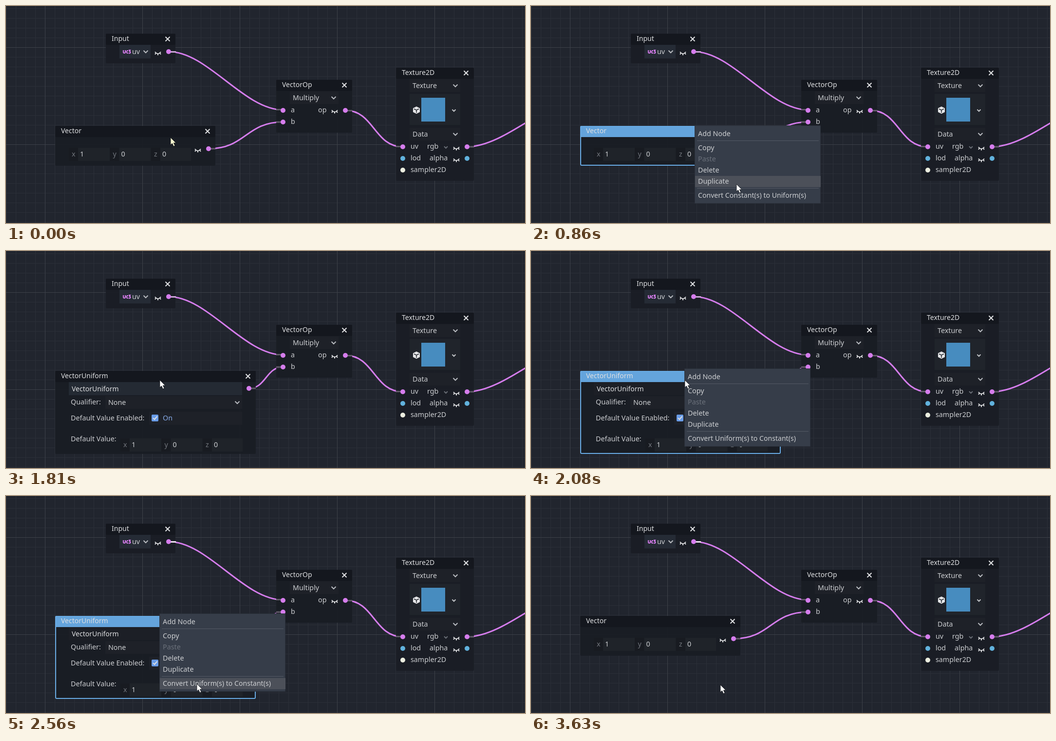
An HTML page that plays this animation: 1066 px wide and 447 px high, repeating every 3.7 s.

```html
<!DOCTYPE html>
<html lang="en">
<head>
<meta charset="utf-8">
<title>Shader graph: constant to uniform</title>
<style>
html, body { margin: 0; width: 100%; height: 100%; overflow: hidden; background: #21252e; }
svg { display: block; width: 1066px; height: 447px; }
text { font: 14.3px "Noto Sans", "Open Sans", sans-serif; fill: #cdcfd2; white-space: pre; }
.title { font-size: 14px; fill: #dfe0e2; }
.long { font-size: 14.1px; }
.dim { fill: #72767d; }
.off { fill: #6b717b; }
.on { fill: #86abe8; }
.line { fill: none; stroke: #e0e1e3; stroke-width: 2; }
.wire { fill: none; stroke: #d67ded; stroke-width: 3; }
.stub { stroke: #615a68; stroke-width: 3; }

.t { animation: 3.7s step-end infinite; }
.vector-idle { animation-name: vector-idle; }
.vector-picked { animation-name: vector-picked; }
.vector-wire { animation-name: vector-wire; }
.uniform-idle { animation-name: uniform-idle; }
.uniform-picked { animation-name: uniform-picked; }
.uniform-wire { animation-name: uniform-wire; }
.menu-a { animation-name: menu-a; }
.menu-b { animation-name: menu-b; }
.hover-a { animation-name: hover-a; }
.hover-b { animation-name: hover-b; }
.glow { animation-name: glow; }
.click { animation-name: click; }
.cursor { animation-name: cursor; }
.arrow { animation-name: arrow; }

@keyframes vector-idle { 0%, 80%, 100% { opacity: 1 } 12.16% { opacity: 0 } }
@keyframes vector-picked { 0%, 35.94%, 100% { opacity: 0 } 12.16% { opacity: 1 } }
@keyframes vector-wire { 0%, 80%, 100% { opacity: 1 } 35.94% { opacity: 0 } }
@keyframes uniform-idle { 0%, 52.43%, 100% { opacity: 0 } 35.94% { opacity: 1 } }
@keyframes uniform-picked { 0%, 80%, 100% { opacity: 0 } 52.43% { opacity: 1 } }
@keyframes uniform-wire { 0%, 80%, 100% { opacity: 0 } 35.94% { opacity: 1 } }
@keyframes menu-a { 0%, 35.94%, 100% { opacity: 0 } 15.94% { opacity: 1 } }
@keyframes menu-b { 0%, 80%, 100% { opacity: 0 } 54.32% { opacity: 1 } }
@keyframes hover-a {
  0%, 100% { opacity: 0; transform: translateY(252px) }
  17.83% { opacity: 1; transform: translateY(252px) }
  19.45% { opacity: 1; transform: translateY(281px) }
  21.35% { opacity: 1; transform: translateY(327px) }
  23.24% { opacity: 1; transform: translateY(350px) }
  24.86% { opacity: 1; transform: translateY(379px) }
}
@keyframes hover-b {
  0%, 100% { opacity: 0; transform: translateY(252px) }
  57.83% { opacity: 1; transform: translateY(252px) }
  59.72% { opacity: 1; transform: translateY(281px) }
  61.62% { opacity: 0; transform: translateY(281px) }
  63.51% { opacity: 1; transform: translateY(327px) }
  65.4% { opacity: 1; transform: translateY(350px) }
  67.29% { opacity: 1; transform: translateY(379px) }
}
@keyframes glow { 0%, 100% { stroke: #cda9d8 } 59.72% { stroke: #f0e6f2 } }
@keyframes click {
  0%, 15.94%, 37.83%, 55.94%, 85.4%, 100% { opacity: 0 }
  10.54%, 34.05%, 52.43%, 80% { opacity: 1 }
}
@keyframes arrow { 0%, 100% { fill: #f5f5cf } 1.89% { fill: #fff } }
@keyframes cursor {
  0%, 100% { transform: translate(338px, 271px) }
  17.83% { transform: translate(345px, 281px) }
  19.45% { transform: translate(370px, 311px) }
  21.35% { transform: translate(402px, 345px) }
  23.24% { transform: translate(422px, 367px) }
  24.86% { transform: translate(428px, 382px) }
  26.75% { transform: translate(430px, 390px) }
  37.83% { transform: translate(425px, 384px) }
  39.72% { transform: translate(404px, 358px) }
  41.62% { transform: translate(372px, 322px) }
  43.24% { transform: translate(343px, 292px) }
  45.13% { transform: translate(326px, 275px) }
  47.02% { transform: translate(318px, 268px) }
  48.91% { transform: translate(316px, 266px) }
  57.83% { transform: translate(321px, 272px) }
  59.72% { transform: translate(338px, 288px) }
  61.62% { transform: translate(358px, 308px) }
  63.51% { transform: translate(375px, 352px) }
  65.4% { transform: translate(384px, 371px) }
  67.29% { transform: translate(390px, 382px) }
  69.18% { transform: translate(392px, 387px) }
  94.32% { transform: translate(391px, 388px) }
  96.21% { transform: translate(390px, 389px) }
  98.1% { transform: translate(389px, 389px) }
}
</style>
</head>
<body>
<svg id="stage" viewBox="0 0 1066 447"></svg>
<script>
const PINK = '#d67ded', BLUE = '#61b2dd', PALE = '#ebeddf', PICKED = '#69ace6';

const rect = (x, y, w, h, fill, extra = '') =>
  `<rect x="${x}" y="${y}" width="${w}" height="${h}" fill="${fill}" ${extra}/>`;
const text = (x, y, str, cls = '') => `<text x="${x}" y="${y}" class="${cls}">${str}</text>`;
const line = (d, x = 0, y = 0, extra = '') =>
  `<path class="line" d="${d}" transform="translate(${x} ${y})" ${extra}/>`;
const group = (cls, body, extra = '') => `<g class="t ${cls}" ${extra}>${body}</g>`;

const port = (x, y, fill = PINK) => `<circle cx="${x}" cy="${y}" r="5" fill="${fill}"/>`;
const stub = (x, y, end, cls = '') => `<path class="stub ${cls}" d="M${x} ${y}H${end}"/>`;
const close = (x, y) => line('M-4.5-4.5 4.5 4.5M4.5-4.5-4.5 4.5', x, y);
const eye = (x, y) => line('M-6-2.5Q0 5 6-2.5M-4.2.5-6 2.6M0 1v3.5M4.2.5 6 2.6', x, y);
const chevron = (x, y, r = 4.5, color = '#b9bcc1') =>
  line(`M${-r} ${-r / 2}L0 ${r / 2} ${r} ${-r / 2}`, x, y, `style="stroke:${color}"`);

// Horizontal S-curve between two ports
function wire(x1, y1, x2, y2) {
  const c = Math.min(80, (x2 - x1) / 2);
  return `<path class="wire" d="M${x1} ${y1}C${x1 + c} ${y1} ${x2 - c} ${y2} ${x2} ${y2}"/>`;
}

function grid() {
  let minor = '', major = '';
  for (let x = 0; x < 1066; x += 20) {
    const d = `M${x + .5} 0V447`;
    x % 200 === 80 ? major += d : minor += d;
  }
  for (let y = 5; y < 447; y += 20) {
    const d = `M0 ${y + .5}H1066`;
    y % 200 === 85 ? major += d : minor += d;
  }
  return `<path d="${minor}" stroke="#2b2f38"/><path d="${major}" stroke="#3d4149"/>`;
}

function frame(x, y, w, h, title, picked) {
  const body = rect(x, y, w, h, '#1a1d24', 'rx="2" opacity=".92"');
  const head = rect(x, y, w, 23, picked ? PICKED : '#15181e', 'rx="2" opacity=".95"');
  const edge = picked
    ? rect(x + 1, y + 1, w - 2, h - 2, 'none', `rx="2" stroke="${PICKED}" stroke-width="2"`) : '';
  return body + head + edge + text(x + 12, y + 15, title, 'title') + close(x + w - 16, y + 11);
}

function dropdown(x, y, w, h, label, fill = '#1e2128') {
  return rect(x, y, w, h, fill) + text(x + 6, y + h / 2 + 5, label) + chevron(x + w - 10, y + h / 2);
}

// Three number boxes, x y z
function fields(x, y) {
  return ['x', 'y', 'z'].map((name, i) => {
    const left = x + i * 84.5;
    return rect(left, y, 19, 27, '#181b21') + rect(left + 19, y, i < 2 ? 65 : 63, 27, '#1f2329') +
      text(left + 6, y + 17.5, name, 'dim') + text(left + 23, y + 18, i ? 0 : 1);
  }).join('');
}

const inputNode = frame(205, 57, 143, 61, 'Input') +
  rect(233, 80, 64, 28, '#252b35') +
  line('M241 91v4q0 2 2 2t2-2v-4M251 92h-1q-2.5 0-2.5 2.5t2.5 2.5h1M252 91h3l-1.5 2.5q2.5.5 2 2.5t-3.5 1',
    0, 0, `style="stroke:${PINK}"`) +
  text(259, 99, 'uv') + chevron(287, 94) + eye(312, 97) +
  stub(334, 94.5, 349, 't glow') + port(334, 94);

const opNode = frame(555, 152, 156, 109, 'VectorOp') +
  dropdown(583, 176, 100, 26, 'Multiply') +
  text(585, 219, 'a') + text(641, 219, 'op') + text(585, 243, 'b') + eye(675, 217) +
  stub(555, 213.5, 569) + stub(555, 239, 569) + stub(697, 215.5, 711) +
  port(569, 215) + port(569, 239) + port(697, 215);

const cube = '<path d="M843 207l7 3.5v8l-7 3.5-7-3.5v-8z" fill="#e4e5e7"/>' +
  '<path d="M838 212l5 2.5 5-2.5M843 214.5v5.5" fill="none" stroke="#20242b" stroke-width="1.5"/>';

const textureNode = frame(801, 127, 160, 233, 'Texture2D') +
  dropdown(829, 151, 104, 26, 'Texture') +
  rect(829, 181, 104, 64, '#20242b') + cube +
  rect(853, 189, 49, 49, '#478cbf') + chevron(920, 215, 3.5, '#c5c7cb') +
  dropdown(829, 251, 104, 26, 'Data') +
  text(831, 294, 'uv') + text(865, 294, 'rgb') + chevron(903.5, 291, 3.5, '#6a6e76') +
  text(831, 318, 'lod') + text(870, 318, 'alpha') + text(831, 342, 'sampler2D') +
  eye(925, 293) + eye(925, 317) +
  stub(801, 289.5, 815) + stub(947, 290, 961) +
  port(815, 290) + port(815, 314, BLUE) + port(815, 338, PALE) +
  port(947, 290) + port(947, 314, BLUE);

const vectorNode = picked => frame(101, 247, 329, 82, 'Vector', picked) +
  fields(129, 292) + eye(394, 297) + stub(416, 294, 430) + port(416, 294);

const uniformNode = picked => frame(101, 247, 412, 171, 'VectorUniform', picked) +
  rect(129, 270, 356, 27, picked ? '#1c1f26' : '#242a33') + text(135, 289, 'VectorUniform', 'title') +
  text(133, 316, 'Qualifier:') + dropdown(204, 299, 281, 26, 'None') +
  text(133, 349, 'Default Value Enabled:') + rect(294, 331, 191, 27, '#1e2128') +
  rect(299, 337, 14, 14, '#699ce8', 'rx="2"') + line('M302 344l3 3 5.500-6.500') +
  text(322, 349, 'On', 'on') +
  text(133, 392, 'Default Value:') + fields(235, 386) +
  stub(499, 283, 513) + port(499, 283);

function menu(hover, convert) {
  const rule = y => rect(341, y, 250, 1, '#545a65');
  return rect(336.5, 246.5, 258, 160, '#363d49', 'stroke="#2c323c"') +
    group(hover, rect(337, 0, 258, 23, '#4c5059')) + rule(277) + rule(375) +
    text(343, 268, 'Add Node') + text(343, 297, 'Copy') + text(343, 320, 'Paste', 'off') +
    text(343, 343, 'Delete') + text(343, 366, 'Duplicate') + text(343, 395, convert, 'long');
}

const cursor = group('click', '<circle cx="-1" cy="-1" r="12" fill="#fffa00" opacity=".5"/>') +
  '<path class="t arrow" d="M0 0V15L3.500 12 6.200 18 9 16.800 6.300 11H11Z" ' +
  'stroke="#14161b" stroke-width=".8"/>';

document.getElementById('stage').innerHTML = grid() +
  wire(334, 94, 569, 214) + wire(697, 215, 815, 290) + wire(947, 290, 1200, 184) +
  group('vector-wire', wire(416, 294, 569, 239)) +
  group('uniform-wire', wire(499, 283, 569, 239)) +
  inputNode + opNode + textureNode +
  group('vector-idle', vectorNode(false)) + group('vector-picked', vectorNode(true)) +
  group('uniform-idle', uniformNode(false)) + group('uniform-picked', uniformNode(true)) +
  group('menu-a', menu('hover-a', 'Convert Constant(s) to Uniform(s)')) +
  `<g transform="translate(-21 -4)">${group('menu-b', menu('hover-b', 'Convert Uniform(s) to Constant(s)'))}</g>` +
  group('cursor', cursor);
</script>
</body>
</html>
```
